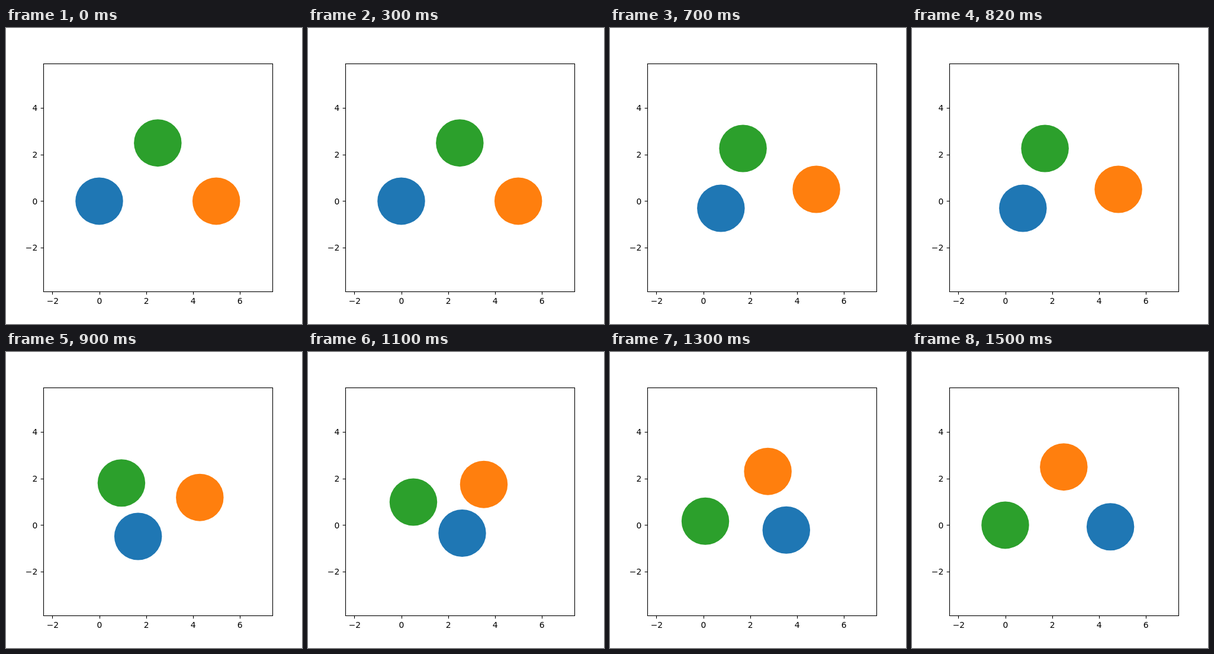
An HTML page that plays this animation: 500x500 px, repeating every 1700 ms.

```html
<!DOCTYPE html>
<html lang="en">
<head>
<meta charset="utf-8">
<title>Three circles</title>
<style>
  html, body { margin: 0; width: 100%; height: 100%; overflow: hidden; background: #fff; }
  svg { display: block; width: 100%; height: 100%; }
  text { font: 13.889px "DejaVu Sans", sans-serif; }
  .axis { fill: none; stroke: #000; stroke-width: 1.11; }
</style>
</head>
<body>
<svg id="stage" viewBox="0 0 500 500"></svg>
<script>
const stage = document.getElementById('stage');
const SCALE_X = 39.54, SCALE_Y = 39.29, EDGE = 0.7, LABEL_SHIFT = 0.5;
const HOLD_FIRST = 500, HOLD = 200, LOOP = 1700;

const toX = x => 157.5 + x * SCALE_X;
const toY = y => 292.4 - y * SCALE_Y;
const snap = v => Math.round(v) + 0.5;

// Each circle takes the place of the next one: it swerves through a few
// points to avoid the others, then heads straight for its goal.
const circles = [
  { color: '#1f77b4', start: [0, 0], swerve: [[.3, -.08], [.755, -.31], [1.66, -.485]], speed: .954 },
  { color: '#ff7f0e', start: [5, 0], swerve: [[4.89, .11], [4.833, .508], [4.295, 1.19]], speed: .95 },
  { color: '#2ca02c', start: [2.5, 2.5], swerve: [[2.39, 2.39], [1.697, 2.263], [.947, 1.812]], speed: .926 }
];

function position({ start, swerve, speed, goal }, step) {
  const bends = swerve.length;
  if (step <= bends) return [start, ...swerve][step];
  const [x, y] = swerve[bends - 1];
  const dx = goal[0] - x, dy = goal[1] - y;
  const part = Math.min(1, (step - bends) * speed / Math.hypot(dx, dy));
  return [x + dx * part, y + dy * part];
}

function add(tag, attrs, text = '') {
  const node = document.createElementNS('http://www.w3.org/2000/svg', tag);
  for (const name in attrs) node.setAttribute(name, attrs[name]);
  node.textContent = text;
  return stage.appendChild(node);
}

function addTick(value, path, x, y, anchor) {
  add('path', { class: 'axis', d: path });
  add('text', { x: x + LABEL_SHIFT, y, 'text-anchor': anchor }, String(value).replace('-', '\u2212'));
}

circles.forEach((circle, i) => {
  circle.goal = circles[(i + 1) % circles.length].start;
  circle.node = add('ellipse', { rx: SCALE_X + EDGE, ry: SCALE_Y + EDGE, fill: circle.color });
});

for (let value = -2; value <= 6; value += 2) {
  const x = toX(value), y = toY(value);
  addTick(value, `M${snap(x)} 445.5v4.86`, x, 466, 'middle');
  if (value < 6) addTick(value, `M63.5 ${snap(y)}h-4.86`, 52.8, Math.round(y + 5.1), 'end');
}
add('rect', { class: 'axis', x: 63.5, y: 60.5, width: 387, height: 385 });

function draw(time) {
  const step = time < HOLD_FIRST ? 0 : 1 + Math.floor((time - HOLD_FIRST) / HOLD);
  for (const circle of circles) {
    const [x, y] = position(circle, step);
    circle.node.setAttribute('cx', toX(x));
    circle.node.setAttribute('cy', toY(y));
  }
}

const start = performance.now();
function tick() {
  draw((performance.now() - start) % LOOP);
  requestAnimationFrame(tick);
}
tick();
</script>
</body>
</html>
```
